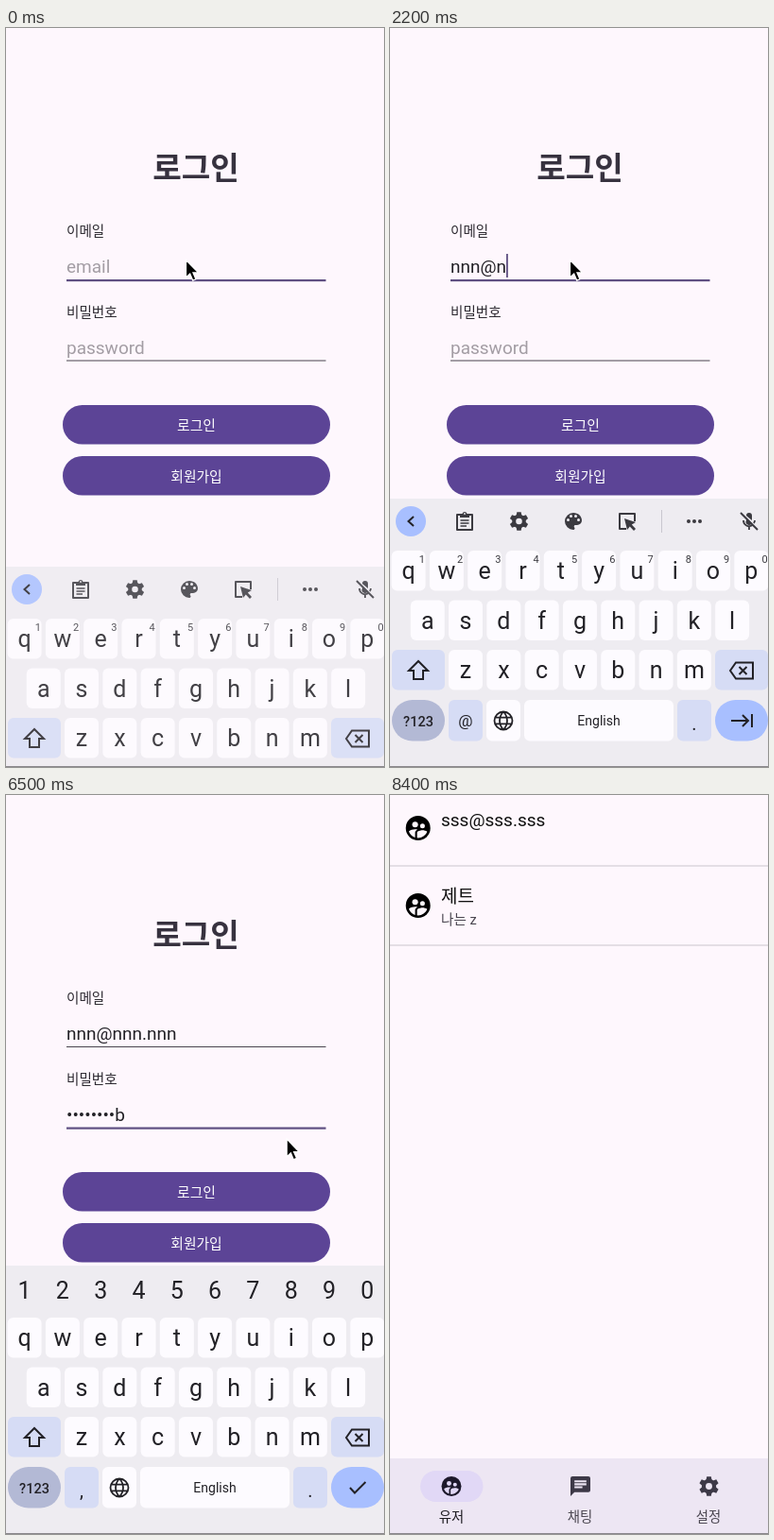
These frames come from a looping animation (400x782 px, 9000 ms). An HTML page:

```html
<!DOCTYPE html>
<html lang="ko">
<head>
<meta charset="utf-8">
<title>로그인</title>
<style>
  html, body { margin: 0; width: 100%; height: 100%; overflow: hidden; background: #fef7fd; }
  svg { display: block; width: 100%; height: 100%; }
  text { font-family: Roboto, "Noto Sans CJK KR", "Noto Sans CJK", sans-serif; }
  .mid { text-anchor: middle; }
  .line { fill: none; stroke: currentColor; stroke-width: 2; }
</style>
</head>
<body>
<svg id="stage" viewBox="0 0 400 782"></svg>
<script>
const LOOP = 9000, STEP = 100;
const BG = '#fef7fd', BOARD = '#eeecf1', KEY = '#fdfbff', KEY_BLUE = '#d6dcf5',
      ACCENT = '#a8bfff', INK = '#222126', BUTTON = '#5c4496', BUTTON_LIT = '#6a53a3', FOCUS = '#5f4f82';

// Markup helpers
const text = (x, y, size, fill, str, extra = '') =>
  `<text x="${x}" y="${y}" font-size="${size}" fill="${fill}" ${extra}>${str}</text>`;
const centred = (x, y, size, fill, str, extra = '') => text(x, y, size, fill, str, `class="mid" ${extra}`);
const rect = (x, y, w, h, r, fill, extra = '') =>
  `<rect x="${x}" y="${y}" width="${w}" height="${h}" rx="${r}" fill="${fill}" ${extra}/>`;
const circle = (x, y, r, fill) => `<circle cx="${x}" cy="${y}" r="${r}" fill="${fill}"/>`;
const line = (d, extra = '') => `<path class="line" d="${d}" ${extra}/>`;
const at = (x, y, color, body, scale = 1) =>
  `<g transform="translate(${x} ${y}) scale(${scale})" color="${color}" fill="${color}">${body}</g>`;
const group = (id, body) => `<g id="${id}">${body}</g>`;

// Icons, centred on the origin
const gear = '<circle class="line" r="5.3" style="stroke-width:4"/>' +
  Array.from({ length: 6 }, (_, i) =>
    `<path d="M-2.9 -6 L-2.2 -9.8 H2.2 L2.9 -6z" transform="rotate(${i * 60})"/>`).join('');

const people = hole => '<circle r="10"/>' +
  `<g fill="${hole}" transform="translate(-12 -12)">` +
  circle(15.6, 10.27, 1.93, hole) + circle(9.6, 9.12, 2.36, hole) +
  '<path d="M9.6 15.9v3.7c-2.4-.7-4.3-2.6-5.1-4.9 1-1.1 3.6-1.7 5.1-1.7.5 0 1.2.1 1.9.2-1.6.9-1.9 2-1.9 2.7z"/>' +
  '<path d="M12 20l-.8-.04v-4.1c0-1.4 2.9-2.1 4.4-2.1 1.1 0 2.9.4 3.8 1.15-1.2 3-4 5.1-7.4 5.1z"/></g>';

const chat = '<path d="M-8 -10H8a2 2 0 0 1 2 2V4a2 2 0 0 1 -2 2H-6L-10 10V-8a2 2 0 0 1 2 -2z"/>' +
  `<path class="line" style="stroke:#ede6f3" d="M-6 -5H6M-6 -2H6M-6 1H2"/>`;

const clipboard = line('M-8 -7H8V9H-8z', 'stroke-linejoin="round"') +
  '<path d="M-4 -8H-2.5A2.6 2.6 0 0 1 2.5 -8H5V-4H-5V-8z"/>' + circle(0, -8, .9, BOARD) +
  line('M-4.5 -1H4.5M-4.5 2H4.5M-4.5 5H2', 'style="stroke-width:1.6"');

const palette = '<path d="M0 -9a9 9 0 0 0 0 18c.8 0 1.5-.7 1.5-1.5 0-.4-.1-.7-.4-1-.2-.3-.4-.6-.4-1 0-.8.7-1.5 1.5-1.5H4a5 5 0 0 0 5-5c0-4.4-4-8-9-8z"/>' +
  [[-5.5, -1.5], [-2.5, -5.5], [2.5, -5.5], [5.5, -1.5]].map(([x, y]) => circle(x, y, 1.5, BOARD)).join('');

const touchPad = line('M-1 8H-8V-8H8V0', 'stroke-linejoin="round"') +
  '<path d="M-3 -3L9 1 4.8 3.6 9 8 7 10 2.8 5.6 0 9z"/>';

const micOff = '<path d="M-3 -6A3 3 0 0 1 3 -6V-1L-3 -6z"/><path d="M-3 -3L3 2A3 3 0 0 1 -3 -1z"/>' +
  line('M-6 -1A6 6 0 0 0 3.5 4M0 5V9M6 -1A6 6 0 0 1 5 2', 'style="stroke-width:1.8"') + line('M-9 -9L9 9');

const globe = line('M-9.5 0A9.5 9.5 0 0 1 9.5 0A9.5 9.5 0 0 1 -9.5 0M-9 -3.4H9M-9 3.4H9' +
  'M0 -9.5C-5.3 -4 -5.3 4 0 9.5M0 -9.5C5.3 -4 5.3 4 0 9.5', 'style="stroke-width:1.8"');

const shift = line('M-10 1L0 -9 10 1H5V10H-5V1z');
const backspace = line('M-12 0L-6 -8.5H12V8.5H-6zM-2.5 -4L5.5 4M5.5 -4L-2.5 4');

// Keyboard
const column = i => 19.6 + 40.3 * i;
const letterRow = (letters, first, y) => [...letters].map((ch, i) => {
  const x = column(first + i);
  return rect(x - 18, y, 36, 42.5, 6, KEY) + centred(x, y + 30, 25, INK, ch);
}).join('');
const digits = draw => [...'1234567890'].map((d, i) => draw(d, column(i))).join('');

const toolbar = circle(22, 522, 16, ACCENT) + at(22, 522, INK, line('M3 -5L-2.5 0 3 5')) +
  at(79, 522, '#3b3a40', clipboard) + at(136.5, 522, '#3b3a40', gear) +
  at(194, 522, '#3b3a40', palette) + at(251, 522, '#3b3a40', touchPad) +
  rect(287, 510, 1, 24, 0, '#c9c7cf') +
  [-6, 0, 6].map(dx => circle(322 + dx, 522, 2, '#3b3a40')).join('') +
  at(380, 522, '#3b3a40', micOff) +
  digits((d, x) => centred(x + 14.2, 565.5, 11, '#3b3a40', d));

const keyboard = rect(0, 498, 400, 360, 0, BOARD) +
  letterRow('qwertyuiop', 0, 553) + letterRow('asdfghjkl', .5, 605.5) + letterRow('zxcvbnm', 1.5, 658) +
  rect(2, 658, 56, 42.5, 6, KEY_BLUE) + at(30, 679, INK, shift) +
  rect(344, 658, 56, 42.5, 6, KEY_BLUE) + at(372, 680, INK, backspace) +
  rect(2, 711, 56, 43.5, 21.7, '#b3b9d5') + centred(30, 738.5, 14.5, INK, '?123', 'font-weight="500"') +
  rect(62, 711, 36, 43.5, 6, KEY_BLUE) + rect(102, 711, 36, 43.5, 6, KEY) + at(120, 733, INK, globe) +
  rect(142, 711, 158, 43.5, 6, KEY) + centred(221, 738, 14, INK, 'English') +
  rect(304, 711, 36, 43.5, 6, KEY_BLUE) + centred(322, 743, 20, INK, '.') +
  rect(344, 711, 56, 43.5, 21.7, ACCENT) +
  group('emailKeys', toolbar + centred(80, 739, 17, INK, '@') +
    at(372, 733, INK, line('M-11 0H6M1 -6L7 0 1 6M11 -7V7'))) +
  group('passwordKeys', digits((d, x) => centred(x, 532.5, 25, INK, d)) + centred(80, 743, 20, INK, ',') +
    at(372, 733, INK, line('M-8 0L-3 5.5 8.5 -6')));

// Screens
const field = (id, label, labelY, baseline) =>
  text(64, labelY, 14.6, '#2c2930', label) + text(64, baseline, 19, INK, '', `id="${id}"`) +
  rect(64, baseline + 7, 274.5, 1, 0, INK, `id="${id}Line"`) +
  rect(64, baseline - 20, 1.8, 25, 0, FOCUS, `id="${id}Caret"`);

const login = rect(0, 0, 400, 782, 0, BG) +
  centred(201, 159.5, 33.2, '#37323f', '로그인', 'font-weight="700"') +
  field('email', '이메일', 220, 259) + field('password', '비밀번호', 305.5, 344.5) +
  rect(60, 399, 283, 41.5, 20.7, BUTTON, 'id="submit"') + centred(201.5, 425.5, 14.8, '#fff', '로그인') +
  rect(60, 453, 283, 41.5, 20.7, BUTTON) + centred(201.5, 479.7, 14.8, '#fff', '회원가입');

const users = at(29.7, 35, '#000', people(BG), 1.3) + text(54, 33, 19, '#111', 'sss@sss.sss') +
  rect(0, 74.5, 400, 1, 0, '#cbc6cd') +
  at(29.7, 117, '#000', people(BG), 1.3) + text(54, 114, 19, '#111', '제트') +
  text(54, 137, 14.6, '#49454f', '나는 z') + rect(0, 158.5, 400, 1, 0, '#cbc6cd');

const home = rect(0, 0, 400, 782, 0, BG) + group('users', users) +
  rect(0, 702, 400, 80, 0, '#ede6f3') + rect(32, 715, 66.5, 33, 16.5, '#e1d8f6') +
  at(65, 731.5, '#1d192b', people('#e1d8f6'), 1.05) + centred(65, 768.5, 14.4, '#1d1b20', '유저') +
  at(201.5, 731.5, '#3d3947', chat, 1.05) + centred(201, 768.5, 14.4, '#49454f', '채팅') +
  at(337.5, 731.5, '#3d3947', gear, 1.05) + centred(337, 768.5, 14.4, '#49454f', '설정');

const pointer = '<path d="M0 0V18.5L4.2 14.6 7.2 21.6 10.4 20.2 7.4 13.4H13z" fill="#000" stroke="#fff" stroke-width="1.2"/>';

document.getElementById('stage').innerHTML = group('login', login) + group('keyboard', keyboard) +
  group('home', home) + group('pointer', pointer) + rect(0, 781, 400, 1, 0, '#8b888d');

// Timeline
const EMAIL = 'nnn@nnn.nnn';
const EMAIL_TIMES = [1100, 1300, 1500, 1900, 2100, 2300, 2500, 2800, 3000, 3200, 3400];
const FOCUS_TIME = 3700;
const PASSWORD_TIMES = [4100, ...Array.from({ length: 8 }, (_, i) => 4400 + 200 * i)];
const EVENTS = [-500, ...EMAIL_TIMES, FOCUS_TIME, ...PASSWORD_TIMES];
const MASK_DELAY = 1500;

const $ = id => document.getElementById(id);
const ramp = (t, from, to) => Math.min(1, Math.max(0, (t - from) / (to - from)));
const smooth = p => p * p * (3 - 2 * p);
const typedBy = (times, t) => times.filter(time => time <= t).length;
const show = (id, visible) => { $(id).style.display = visible ? '' : 'none'; };

function setField(id, value, hint, focused, caretOn) {
  const label = $(id);
  label.textContent = value || hint;
  label.setAttribute('fill', value ? INK : '#a39da4');
  $(id + 'Line').setAttribute('height', focused ? 2.2 : 1);
  $(id + 'Line').setAttribute('fill', focused ? FOCUS : '#4a454f');
  $(id + 'Caret').setAttribute('x', 64 + (value ? label.getComputedTextLength() : 0));
  show(id + 'Caret', focused && caretOn);
}

function maskedPassword(t) {
  const count = typedBy(PASSWORD_TIMES, t);
  if (!count) return '';
  const revealed = t < PASSWORD_TIMES[count - 1] + MASK_DELAY;
  return '•'.repeat(count - 1) + (revealed ? 'b' : '•');
}

function render(t) {
  const onPassword = t >= FOCUS_TIME;
  const lastEvent = EVENTS.filter(time => time <= t).pop();
  const caretOn = (t - lastEvent) % 1000 < 500;
  setField('email', EMAIL.slice(0, typedBy(EMAIL_TIMES, t)), 'email', !onPassword, caretOn);
  setField('password', maskedPassword(t), 'password', onPassword, caretOn);
  $('submit').setAttribute('fill', t >= 7000 && t < 7400 ? BUTTON_LIT : BUTTON);

  const hidden = (1 - ramp(t, 0, 200)) ** 2;
  const closing = ramp(t, 7500, 7800);
  $('keyboard').setAttribute('transform', `translate(0 ${72 * hidden + 284 * closing ** 2})`);
  $('keyboard').setAttribute('opacity', 1 - .15 * hidden);
  show('emailKeys', !onPassword);
  show('passwordKeys', onPassword);

  $('home').setAttribute('opacity', ramp(t, 7500, 7800));
  show('home', t > 7500);
  show('users', t >= 7900);

  const move = smooth(ramp(t, 6000, 6800)), leave = ramp(t, 7500, 7800);
  $('pointer').setAttribute('transform', `translate(${190.5 + 156 * move + 70 * leave} ${245.5 + 173.5 * move})`);
}

function tick() {
  const t = performance.now() % LOOP;
  render(Math.floor(t / STEP) * STEP);
  requestAnimationFrame(tick);
}
tick();
</script>
</body>
</html>
```
